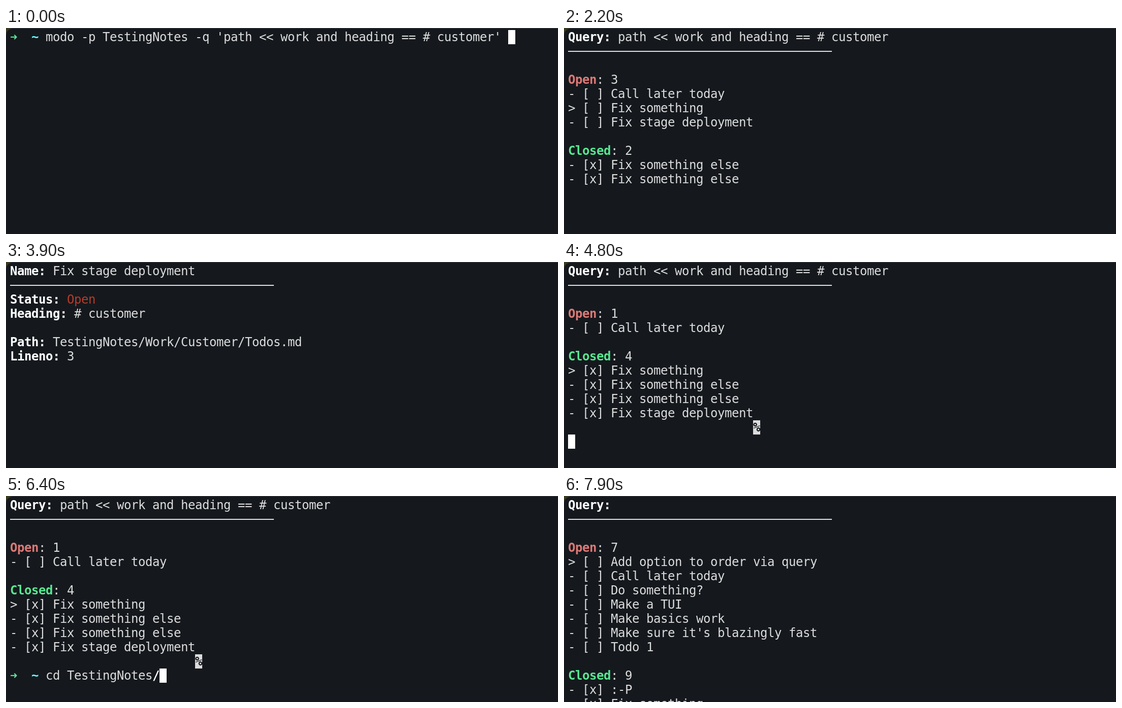
These frames come from a looping animation (1086 px wide and 406 px high, 8 s). An HTML page:

```html
<!DOCTYPE html>
<html lang="en">
<head>
<meta charset="utf-8">
<title>Terminal todo list</title>
<style>
  html, body { margin: 0; width: 100%; height: 100%; overflow: hidden; background: #3b391d; }
  #term {
    position: relative; box-sizing: border-box; width: 1086px; height: 406px; overflow: hidden;
    background: #15191e; border-top: 1px solid #34383b; border-top-left-radius: 14px;
  }
  #screen { position: absolute; left: 8px; top: 3px; }
  #screen, #screen * {
    font: 24px/28px "DejaVu Sans Mono", monospace;
    letter-spacing: calc(14px - 1ch);
    color: #dcdcdc;
  }
  .row { height: 28px; white-space: pre; }
  #screen b { font-weight: bold; color: #fff; }
  #screen .open { color: #dd7975; }
  #screen .closed { color: #58e790; }
  #screen .dir { color: #60fdff; }
  #screen .red { color: #b43c2a; }
  #screen .arrow, #screen .cursor, #screen .mark { display: inline-block; width: 14px; height: 28px; vertical-align: top; }
  #screen .arrow { color: #58e790; }
  .cursor { background: #fff; }
  #screen .mark { background: #dcdcdc; color: #15191e; }
  .rule { width: 519px; height: 2px; background: #e2e2e2; position: relative; top: 13px; }
</style>
</head>
<body>
<div id="term"><div id="screen"></div></div>
<script>
const LOOP = 8000;
const screen = document.getElementById('screen');

const esc = s => s.replace(/&/g, '&amp;').replace(/</g, '&lt;').replace(/>/g, '&gt;');
const bold = (s, cls = '') => `<b class="${cls}">${s}</b>`;
const cursor = '<span class="cursor"></span>';
const rule = '<div class="rule"></div>';
const prompt = (dir, cmd) => `${bold('➜', 'arrow')}  ${bold(dir, 'dir')} ${esc(cmd)}`;

const query = 'path << work and heading == # customer';
const call = 'Call later today';
const fix = 'Fix something';
const other = 'Fix something else';
const stage = 'Fix stage deployment';

// Todo view; `at` is the index of the selected item across both lists.
function list(text, open, closed, at, closedCount = closed.length) {
  const item = (box, from) => (name, i) => `${i + from === at ? '&gt;' : '-'} [${box}] ${name}`;
  return [
    `${bold('Query:')} ${esc(text)}`, rule, '',
    `${bold('Open', 'open')}: ${open.length}`, ...open.map(item(' ', 0)), '',
    `${bold('Closed', 'closed')}: ${closedCount}`, ...closed.map(item('x', open.length))
  ];
}

const detail = [
  `${bold('Name:')} ${stage}`, rule,
  `${bold('Status:')} <span class="red">Open</span>`,
  `${bold('Heading:')} # customer`, '',
  `${bold('Path:')} TestingNotes/Work/Customer/Todos.md`,
  `${bold('Lineno:')} 3`
];

const done = list(query, [call], [fix, other, other, stage], 1);
const shell = (...rows) => [...done, ' '.repeat(26) + bold('%', 'mark'), ...rows];
const cd = cmd => shell(prompt('~', cmd) + cursor);
const run = cmd => shell(prompt('~', 'cd TestingNotes'), prompt('TestingNotes', cmd) + cursor);

const everything = list('', [
  'Add option to order via query', call, 'Do something?', 'Make a TUI',
  'Make basics work', "Make sure it's blazingly fast", 'Todo 1'
], [':-P', fix], 0, 9);

const timeline = [
  [0, [prompt('~', `modo -p TestingNotes -q '${query}' `) + cursor]],
  [700, list(query, [call, fix, stage], [other, other], 0)],
  [1800, list(query, [call, fix, stage], [other, other], 1)],
  [2500, list(query, [call, stage], [fix, other, other], 1)],
  [3000, detail],
  [4200, done],
  [4800, shell(cursor)],
  [4900, cd('')],
  [5400, cd('cd')],
  [5500, cd('cd ')],
  ...[1, 2, 3, 4].map(n => [5700 + n * 100, cd('cd ' + 'Test'.slice(0, n))]),
  [6300, shell(prompt('~', 'cd TestingNotes') + bold('/') + cursor)],
  [6900, run('')],
  [7200, run('m')],
  [7400, run('mod')],
  [7500, run('modo')],
  [7800, everything]
];

let shown;
function draw() {
  const t = performance.now() % LOOP;
  const rows = timeline.filter(([at]) => at <= t).pop()[1];
  if (rows !== shown) {
    shown = rows;
    screen.innerHTML = rows.map(r => `<div class="row">${r}</div>`).join('');
  }
  requestAnimationFrame(draw);
}
draw();
</script>
</body>
</html>
```
